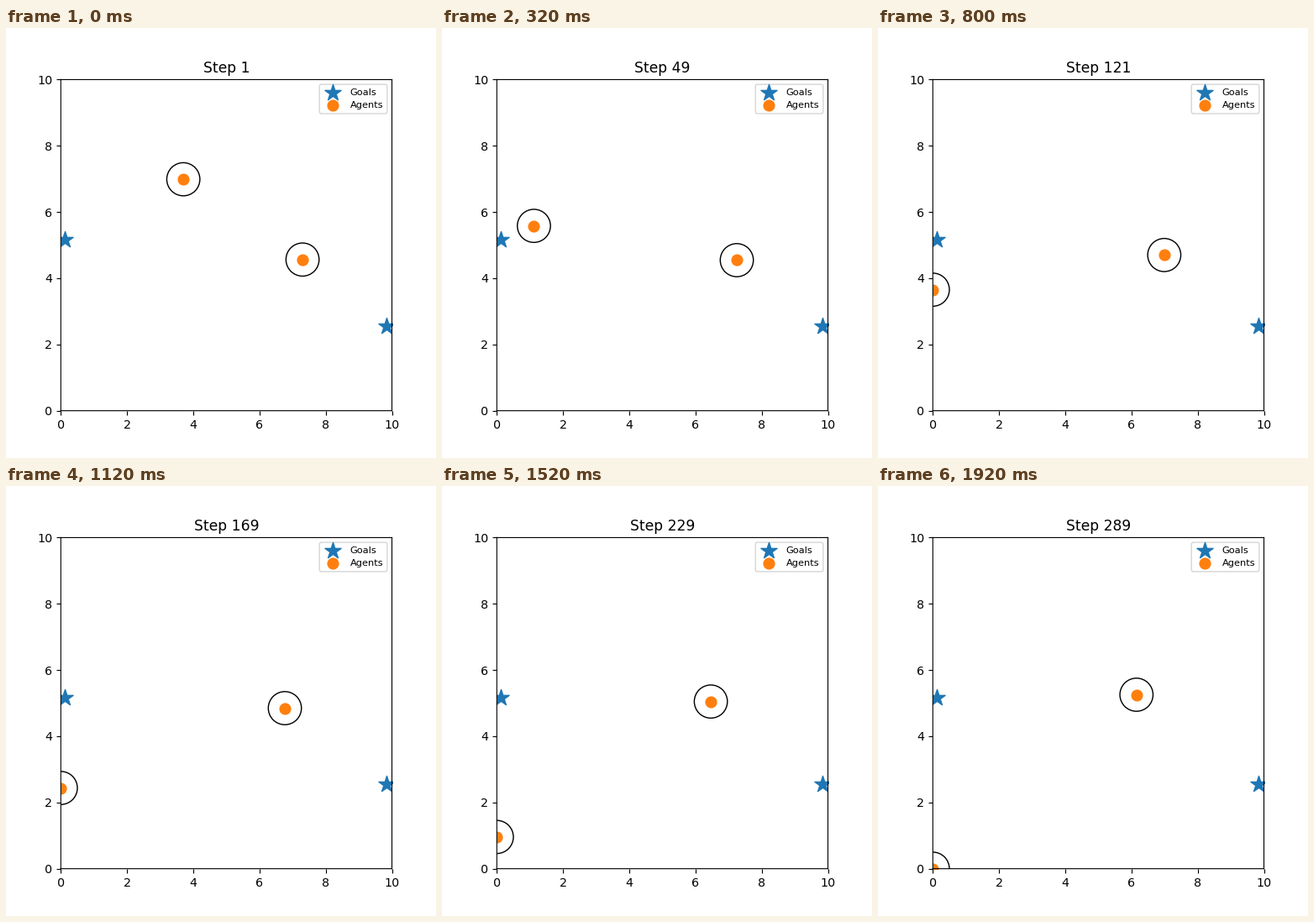
Write a matplotlib script that moves like this. It is 512 px wide and 512 px high and loops after 2000 ms.

```python
import math

import matplotlib.pyplot as plt
from matplotlib.animation import FuncAnimation
from matplotlib.patches import Circle

FRAMES = 25
INTERVAL = 80
STEPS_PER_FRAME = 12
SIZE = 10
RADIUS = 0.5
GOALS = [(0.12, 5.17), (9.83, 2.56)]

plt.rcParams["path.snap"] = False


def drift(start, speed, kick, tau, t):
    """Steady speed plus an extra speed that fades away."""
    pos = start + speed * t + kick * tau * (1 - math.exp(-t / tau))
    return min(max(pos, 0), SIZE)


def agents_at(t):
    return [
        (drift(3.70, -0.645, 0, 1, t), drift(6.99, -0.285, -0.085, 8, t)),
        (drift(7.30, -0.0642, 0.072, 5.5, t), drift(4.565, 0.0418, -0.07, 4.5, t)),
    ]


fig, ax = plt.subplots(figsize=(5, 5), dpi=102.4)
ax.set_aspect("equal")
ax.set_xlim(0, SIZE)
ax.set_ylim(0, SIZE)

start = agents_at(0)
ax.scatter(*zip(*GOALS), s=200, marker="*", color="C0", label="Goals")
dots = ax.scatter(*zip(*start), s=80, color="C1", label="Agents")
rings = [ax.add_patch(Circle(p, RADIUS, fill=False, color="black")) for p in start]
title = ax.set_title("Step 1")
ax.legend(loc="upper right", fontsize=8)


def update(i):
    agents = agents_at(i)
    dots.set_offsets(agents)
    for ring, pos in zip(rings, agents):
        ring.center = pos
    title.set_text(f"Step {1 + STEPS_PER_FRAME * i}")
    return [dots, title, *rings]


anim = FuncAnimation(fig, update, frames=FRAMES, interval=INTERVAL,
                     repeat=True, repeat_delay=0)
plt.show()
```
